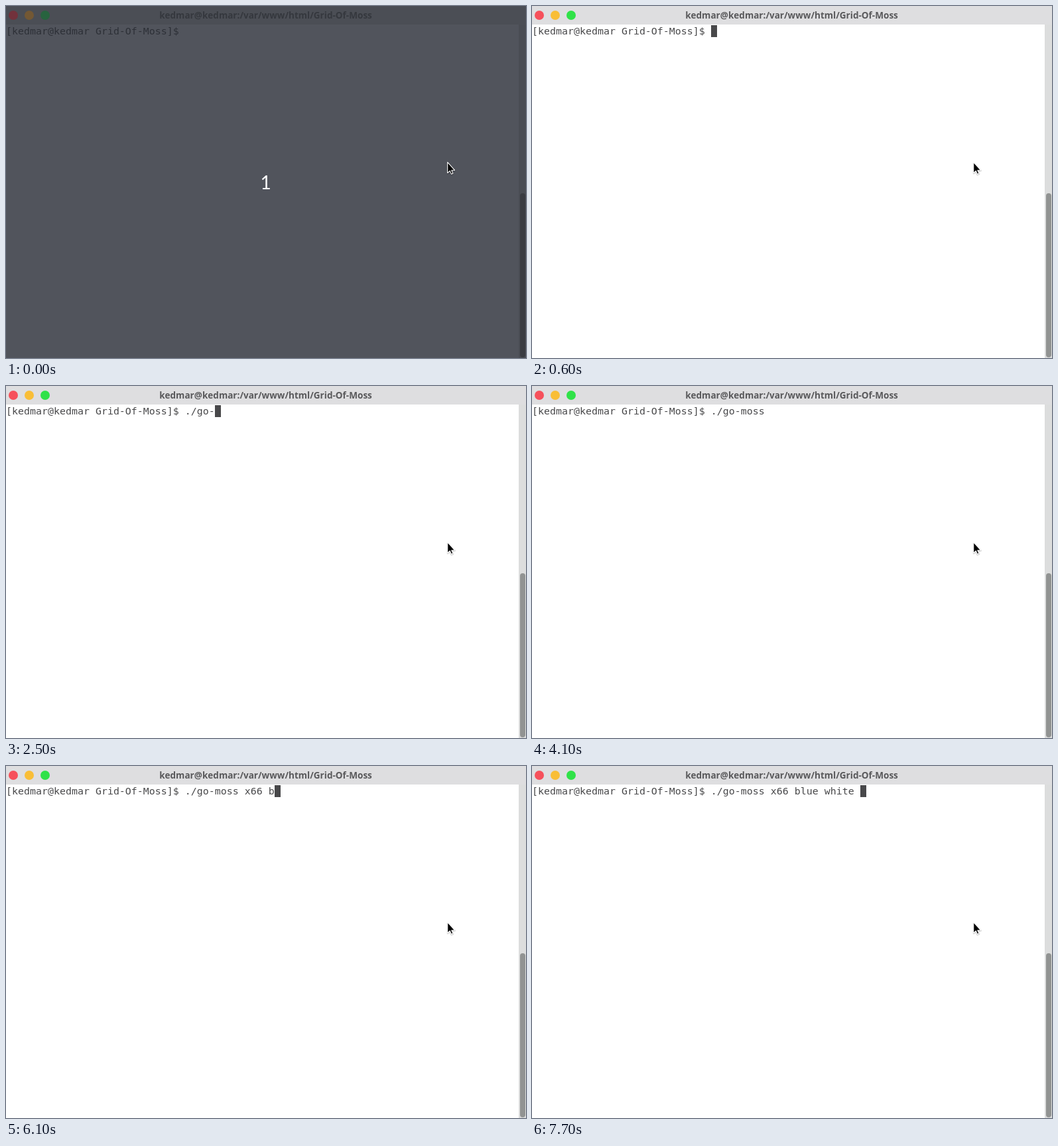
Animation of 784x532 px, one loop 8000 ms. Source, as an HTML page:

```html
<!DOCTYPE html>
<html lang="en">
<head>
<meta charset="utf-8">
<title>Terminal</title>
<style>
  html, body { margin: 0; width: 100%; height: 100%; overflow: hidden; background: #fff; }
  svg {
    display: block; width: 784px; height: 532px;
    --page: #fff; --bar: #dedee0; --track: #dcdddd; --thumb: #919392;
    --ink: #48484a; --title: #59595b;
    --red: #f6505b; --yellow: #f9be37; --green: #2fe248;
  }
  svg.dim {
    --page: #51545c; --bar: #4b4e55; --track: #4a4d54; --thumb: #3a3c42;
    --ink: #2d3037; --title: #35383e;
    --red: #72323c; --yellow: #735834; --green: #28633f;
  }
  .title { font: 700 13.55px "Noto Sans", "Open Sans", sans-serif; fill: var(--title); text-anchor: middle; }
  .line { font: 14.95px "DejaVu Sans Mono", monospace; fill: var(--ink); white-space: pre; }
  .count { font: 28px Lato, sans-serif; fill: #fff; text-anchor: middle; }
</style>
</head>
<body>
<svg id="stage" viewBox="0 0 784 532">
  <rect width="784" height="532" fill="var(--page)"/>
  <rect width="784" height="28" fill="var(--bar)"/>
  <circle cx="11" cy="14" r="7" fill="var(--red)"/>
  <circle cx="35" cy="14" r="7" fill="var(--yellow)"/>
  <circle cx="59" cy="14" r="7" fill="var(--green)"/>
  <text class="title" x="391.5" y="19">kedmar@kedmar:/var/www/html/Grid-Of-Moss</text>
  <rect x="773" y="28" width="11" height="504" fill="var(--track)"/>
  <rect x="775" y="283" width="8" height="248" rx="4" fill="var(--thumb)"/>
  <text class="line" id="line" x="0" y="43"></text>
  <rect id="caret" y="29" width="9" height="18" fill="var(--ink)"/>
  <text class="count" id="count" x="391.5" y="277">1</text>
  <g stroke-linejoin="round">
    <path d="M666 237.5V253l3.3-3 2.2 5 2.6-1.1-2.1-4.9h4.6z" fill="none" stroke="#000" stroke-opacity=".16" stroke-width="2.6"/>
    <path d="M665.7 236.2V252.300l3.600-3.200 2.200 5 2.400-1-2.100-4.900h4.700z" fill="#000" stroke="#fff" stroke-width="1.100"/>
  </g>
</svg>
<script>
  const LOOP = 8000, CELL = 9, DIM_END = 600;
  const PROMPT = "[kedmar@kedmar Grid-Of-Moss]$ ";
  const COMMAND = "./go-moss x66 blue white ";

  // [time, characters typed, caret visible, mistyped tail]
  const STEPS = [
    [0, 0, false], [200, 0, true],
    [700, 1, true], [1000, 2, true], [1300, 2, false], [1500, 2, true],
    [1600, 2, true, "h"], [1800, 2, true],
    [2000, 3, true], [2100, 4, true], [2500, 5, true],
    [2700, 6, true], [2800, 7, true], [2900, 8, true], [3000, 9, true],
    [3200, 10, true], [4100, 10, false], [4500, 10, true], [4600, 11, true],
    [5000, 12, true], [5100, 13, true], [5500, 14, true],
    [6100, 15, true], [6300, 17, true], [6500, 18, true],
    [6800, 19, true], [6900, 20, true], [7000, 22, true], [7100, 23, true],
    [7200, 24, true], [7700, 25, true]
  ];

  const [stage, line, caret, count] =
    ["stage", "line", "caret", "count"].map(id => document.getElementById(id));
  const show = (el, on) => el.setAttribute("visibility", on ? "visible" : "hidden");

  function draw(t) {
    const [, typed, caretOn, typo = ""] = STEPS.findLast(step => step[0] <= t);
    const text = PROMPT + COMMAND.slice(0, typed) + typo;
    const dim = t < DIM_END;
    line.textContent = text;
    caret.setAttribute("x", text.length * CELL);
    show(caret, caretOn);
    show(count, dim);
    stage.classList.toggle("dim", dim);
  }

  const start = performance.now();
  function tick() {
    draw((performance.now() - start) % LOOP);
    requestAnimationFrame(tick);
  }
  tick();
</script>
</body>
</html>
```
